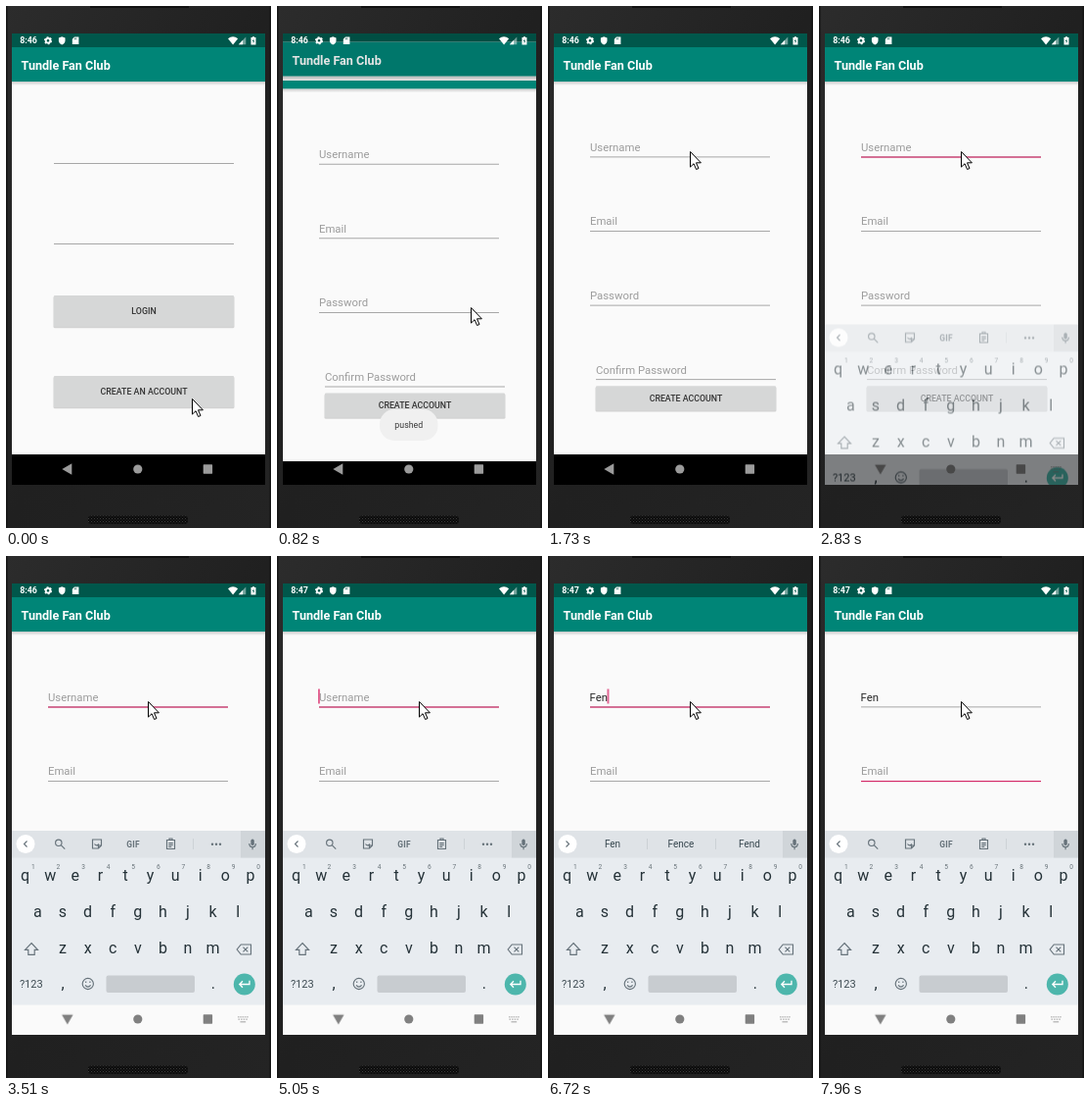
An HTML page for the animation above (8000 ms loop, 271 px wide and 532 px high).

```html
<!DOCTYPE html>
<html lang="en">
<head>
<meta charset="utf-8">
<title>Fan club sign-up</title>
<style>
html, body { margin: 0; width: 100%; height: 100%; overflow: hidden; background: #222; }
svg { display: block; width: 271px; height: 532px; font-family: Roboto, "Open Sans", sans-serif; }
.mid { text-anchor: middle; }
.bar { font-size: 12.6px; font-weight: 600; fill: #fff; }
.btn { font-size: 8.82px; font-weight: 500; fill: #333; text-anchor: middle; }
.input { font-size: 11.34px; fill: #242424; }
.hint { fill: #9c9c9c; }
.key { font-size: 16px; fill: #253238; text-anchor: middle; }
.sup { font-size: 6.6px; fill: #69747a; text-anchor: middle; }
.gif { font-size: 8.4px; font-weight: 700; letter-spacing: .3px; fill: #66727a; text-anchor: middle; }
.ico { fill: none; stroke: #66727a; stroke-width: 1.15; }

/* Everything changes in hard steps on one shared 8 s clock. */
.a { animation: 8s step-end -4ms infinite; }

.mouse { animation-name: mouse; }
@keyframes mouse {
  0% { transform: translate(190px, 400px); }
  6.875% { transform: translate(190px, 395px); }
  8.75% { transform: translate(195px, 352px); }
  10.25% { transform: translate(198px, 307px); }
  17.125% { transform: translate(191px, 288px); }
  18.625% { transform: translate(172px, 232px); }
  20.125% { transform: translate(152px, 170px); }
  21.625%, 100% { transform: translate(145px, 148px); }
}

.toast { animation-name: toast; }
@keyframes toast {
  0% { opacity: 0; }
  3.5% { opacity: .3; }
  5.375% { opacity: .7; }
  6.875% { opacity: 1; }
  17.125% { opacity: .75; }
  18.625% { opacity: .35; }
  20.125%, 100% { opacity: 0; }
}

.leave { animation-name: leave; }
@keyframes leave {
  0% { transform: none; }
  8.75% { transform: translateY(-1px); }
  10.25% { transform: translateY(-5.5px); }
  11.75%, 100% { transform: translateY(-8px); }
}
.dim { animation-name: dim; }
@keyframes dim {
  0% { opacity: 0; }
  8.75% { opacity: .02; }
  10.25%, 100% { opacity: .1; }
}
.reveal { animation-name: reveal; }
@keyframes reveal {
  0% { transform: translateY(532px); }
  8.75% { transform: translateY(440px); }
  10.25% { transform: translateY(76px); }
  11.75% { transform: translateY(48px); }
  13.625%, 100% { transform: translateY(0); }
}
.enter { animation-name: enter; }
@keyframes enter {
  0% { transform: translateY(19px); }
  10.25% { transform: translateY(7.3px); }
  11.75% { transform: translateY(3px); }
  13.625% { transform: translateY(1px); }
  15.25%, 100% { transform: translateY(0); }
}

.caret { animation-name: caret; }
@keyframes caret {
  0% { opacity: 0; transform: none; }
  27% { opacity: 1; }
  32% { opacity: 0; }
  38.875% { opacity: 1; }
  43.875% { opacity: 0; }
  50.875% { opacity: 1; }
  57.75% { opacity: 0; }
  63.125% { opacity: 1; }
  68.25% { opacity: 0; }
  75.125% { opacity: 1; transform: none; }
  77% { transform: translateX(7px); }
  80.5% { transform: translateX(12.5px); }
  84% { transform: translateX(18.5px); }
  89.375% { opacity: 0; }
  96.375% { opacity: 1; transform: translateY(75.6px); }
  99.5%, 100% { opacity: 0; transform: translateY(75.6px); }
}
.focus1 { animation-name: focus1; }
@keyframes focus1 { 0%, 92.875%, 100% { opacity: 0; } 25.125% { opacity: 1; } }
.focus2 { animation-name: focus2; }
@keyframes focus2 { 0% { opacity: 0; } 92.875%, 100% { opacity: 1; } }
.empty { animation-name: empty; }
@keyframes empty { 0% { opacity: 1; } 77%, 100% { opacity: 0; } }
.type1 { animation-name: type1; }
@keyframes type1 { 0% { fill: transparent; } 77%, 100% { fill: #242424; } }
.type2 { animation-name: type2; }
@keyframes type2 { 0% { fill: transparent; } 80.5%, 100% { fill: #242424; } }
.type3 { animation-name: type3; }
@keyframes type3 { 0% { fill: transparent; } 84%, 100% { fill: #242424; } }

.min1 { animation-name: min1; }
@keyframes min1 { 0% { opacity: 1; } 52.375%, 100% { opacity: 0; } }
.min2 { animation-name: min2; }
@keyframes min2 { 0% { opacity: 0; } 52.375%, 100% { opacity: 1; } }

.board { animation-name: board; }
@keyframes board {
  0% { opacity: 0; transform: translateY(45px); }
  35.375% { opacity: .54; transform: translateY(44.5px); }
  37% { opacity: .94; transform: none; }
  38.875%, 100% { opacity: 1; transform: none; }
}
.upper { animation-name: upper; }
@keyframes upper { 0%, 78.625%, 100% { opacity: 0; } 75.125% { opacity: 1; } }
.lower { animation-name: lower; }
@keyframes lower { 0%, 78.625%, 100% { opacity: 1; } 75.125% { opacity: 0; } }
.tools { animation-name: tools; }
@keyframes tools { 0% { opacity: 1; } 78.625% { opacity: 0; } 96.375% { opacity: .6; } 98%, 100% { opacity: 1; } }
.words1 { animation-name: words1; }
@keyframes words1 { 0%, 82.125%, 100% { opacity: 0; } 78.625% { opacity: 1; } }
.words2 { animation-name: words2; }
@keyframes words2 { 0%, 84%, 100% { opacity: 0; } 82.125% { opacity: 1; } }
.words3 { animation-name: words3; }
@keyframes words3 { 0%, 96.375%, 100% { opacity: 0; } 84% { opacity: 1; } }
.chev { animation-name: chev; transform-origin: 20px 293.5px; }
@keyframes chev { 0%, 96.375%, 100% { transform: none; } 78.625% { transform: rotate(180deg); } }

.nav { animation-name: nav; }
@keyframes nav { 0% { fill: #9b9b9b; } 35.375% { fill: #484848; } 37%, 100% { fill: #808080; } }
.back { animation-name: back; transform-origin: 62.8px 472px; }
@keyframes back {
  0% { transform: none; }
  30.5% { transform: rotate(-30deg); }
  32% { transform: rotate(-70deg); }
  33.5%, 100% { transform: rotate(-90deg); }
}
.ime { animation-name: ime; }
@keyframes ime { 0% { opacity: 0; } 32% { opacity: .3; } 33.5%, 100% { opacity: .5; } }
</style>
</head>
<body>
<svg id="stage" viewBox="0 0 271 532"></svg>
<script>
const rect = (x, y, w, h, fill, more = '') =>
  `<rect x="${x}" y="${y}" width="${w}" height="${h}" fill="${fill}" ${more}/>`;
const text = (x, y, cls, s) => `<text x="${x}" y="${y}" class="${cls}">${s}</text>`;
const icon = d => `<path class="ico" d="${d}"/>`;
const line = (x, y) => rect(x, y, 184, .8, '#939393');
const accent = (y, cls) => rect(43, y, 184, 1.05, '#d81b60', `class="a ${cls}"`);
const field = (x, y, label, cls = '') => text(x, y - 5.8, `input hint ${cls}`, label) + line(x, y);
const button = (y, h, label) =>
  rect(48.5, y + .6, 185, h + .6, '#000', 'rx="1.5" opacity=".16"') +
  rect(49, y, 184, h, '#d6d7d7', 'rx="1"') +
  text(141, y + h / 2 + 2.9, 'btn', label);

const chrome = () =>
  rect(6, 28, 259, 429, '#fafafa') +
  rect(6, 77, 259, 4, 'url(#shade)') +
  rect(6, 42, 259, 35, '#008577') +
  rect(6, 14, 259, 28, '#00574b') +
  text(15.5, 65, 'bar', 'Tundle Fan Club');

const login = () => chrome() + line(49, 160) + line(49, 242) +
  button(295, 32, 'LOGIN') + button(377, 32, 'CREATE AN ACCOUNT');

// Fields are spaced 75.6 px apart.
const first = 153.5, gap = 75.6;
const signup = () => chrome() +
  field(43, first, 'Username', 'a empty') + field(43, first + gap, 'Email') +
  field(43, first + 2 * gap, 'Password') + field(49, first + 3 * gap, 'Confirm Password') +
  button(387.3, 25, 'CREATE ACCOUNT') +
  accent(first, 'focus1') + accent(first + gap, 'focus2') +
  `<text x="42.5" y="${first - 5.8}" class="input">${[...'Fen'].map((c, i) =>
    `<tspan class="a type${i + 1}">${c}</tspan>`).join('')}</text>` +
  rect(42.3, 135.5, 1.3, 15, '#d81b60', 'class="a caret"');

const rows = [['qwertyuiop', 19.6, 332], ['asdfghjkl', 32.4, 369], ['zxcvbnm', 58, 406]];
const pitch = 25.6;
const letters = up => rows.map(([keys, x, y]) => [...keys].map((c, i) =>
  text(x + i * pitch, y - (up ? 0 : .8), 'key', up ? c.toUpperCase() : c)).join('')).join('');
const digits = [...'1234567890'].map((c, i) => text(27.8 + i * pitch, 319.2, 'sup', c)).join('');

const shift = 'M26 394.5l6.5 6.8h-3.3v5h-6.4v-5h-3.3z';
const words = [['For', 'From', 'First'], ['Few', 'Feel', 'Fell'], ['Fen', 'Fence', 'Fend']]
  .map((set, n) => `<g class="a words${n + 1}" font-size="10" fill="#37474f">` +
    set.map((w, i) => text(66 + i * 70, 297, 'mid', w)).join('') +
    rect(101, 288, .7, 11, '#c3c9cd') + rect(171, 288, .7, 11, '#c3c9cd') + '</g>').join('');

const tools = `<g class="a tools">
  <circle class="ico" cx="53.8" cy="292.3" r="3.2"/>${icon('M56.2 294.7l4 4')}
  ${icon('M88.5 289h9v6l-3 3h-6zM97.5 295h-3v3M90.5 293.5q2 2.8 4.5 0')}
  ${text(130.2, 296.5, 'gif', 'GIF')}
  ${icon('M164.5 289.5h8v9h-8zM167 289.2v-1.2h3v1.2M166.3 292.5h4.4M166.3 294.4h4.4M166.3 296.3h3')}
  ${rect(191, 288, .8, 11, '#c9ced2')}
  <g fill="#66727a"><circle cx="211" cy="293.8" r="1.2"/><circle cx="215" cy="293.8" r="1.2"/><circle cx="219" cy="293.8" r="1.2"/></g>
</g>`;

const board = `<g class="a board">
  ${rect(6, 280, 259, 178, '#e8ecf0')}${rect(6, 280, 259, 27.5, '#dfe3e7')}
  ${rect(240, 280, 25, 27.5, '#d0d5d9')}${rect(6, 457.5, 259, 80, '#fafafa')}
  <circle cx="20" cy="293.5" r="9.5" fill="#fff"/>
  <path class="ico a chev" d="M21.5 290.5l-3 3 3 3"/>
  ${tools}${words}
  ${rect(250.4, 288.5, 3.4, 6.4, '#66727a', 'rx="1.7"')}${icon('M248.8 293q0 3.6 3.3 3.6t3.3-3.6M252.1 296.6v2.6')}
  ${digits}
  <g class="a lower">${letters(false)}${icon(shift)}</g>
  <g class="a upper">${letters(true)}<path d="${shift}" fill="#56656d"/></g>
  ${icon('M240.2 396h10.3v10h-10.3l-4-5zM242.5 398.6l4.8 4.8M247.3 398.6l-4.8 4.8')}
  <text x="25.8" y="440" class="mid" font-size="11" fill="#3e4b52">?123</text>
  ${text(58.2, 440.5, 'key', ',')}${text(211.8, 440.5, 'key', '.')}
  <circle class="ico" cx="83.8" cy="436" r="5.6"/>${icon('M81 437.4q2.8 3.4 5.6 0M81.7 433.6v1.4M85.9 433.6v1.4')}
  ${rect(102.5, 427.5, 90.5, 17.5, '#c8ccd0', 'rx="2"')}
  <circle cx="243.8" cy="436.5" r="11" fill="#4db6ac"/>
  <path d="M249 432.8v3.7h-10M242 433.3l-3.2 3.2 3.2 3.2" fill="none" stroke="#fff" stroke-width="1.3"/>
</g>`;

const nav = `<g class="a nav">
  <path class="a back" d="M57.3 472l10-5.8v11.6z"/>
  <circle cx="134.8" cy="472" r="4.6"/>
  <rect x="201.7" y="467.3" width="9.4" height="9.4" rx=".6"/>
  <path class="a ime" d="M237 469h1.5v1.5h-1.5zm2.3 0h1.5v1.5h-1.5zm2.3 0h1.5v1.5h-1.5zm2.3 0h1.5v1.5h-1.5zm2.3 0h1.5v1.5h-1.5zM237.5 471.4h1.5v1.5h-1.5zm2.6 0h1.5v1.5h-1.5zm2.6 0h1.5v1.5h-1.5zm2.6 0h1.5v1.5h-1.5zM239.5 474h5.7v1.4h-5.7z"/>
</g>`;

const status = `<g fill="#fff" font-size="8.8" font-weight="600">
  ${text(14.3, 38.4, 'a min1', '8:46')}${text(14.3, 38.4, 'a min2', '8:47')}
  <circle cx="43" cy="35.3" r="2.3" fill="none" stroke="#fff" stroke-width="1.9"/>
  <circle cx="43" cy="35.3" r="3.5" fill="none" stroke="#fff" stroke-width="1.1" stroke-dasharray="1.9 1.765"/>
  <path d="M57.2 31.3l3.3 1.3v2.7q0 2.8-3.3 4.3-3.3-1.5-3.3-4.3v-2.7z"/>
  <path d="M70 31.5h4.4v7.6h-6.6v-5.4zM70.3 32.6v1.6h.7v-1.6zm1.3 0v1.6h.7v-1.6z" fill-rule="evenodd"/>
  <path d="M227 33.2q5-4 10.2 0l-5.1 6.2z"/>
  <path d="M245.3 31.5v7.7h-7.4z" opacity=".45"/><path d="M242.2 34.7v4.5h-4.3z"/>
  <path d="M251.9 31.2h2.2v.8h1.4v7.4h-5v-7.4h1.4z"/>
  <path d="M253.4 33.2l-1.5 2.9h1l-.3 2.2 1.6-2.9h-1z" fill="#00574b"/>
</g>`;

document.getElementById('stage').innerHTML = `
<defs>
  <linearGradient id="case" x2="1" y2="1">
    <stop stop-color="#2c2c2c"/><stop offset=".5" stop-color="#202020"/><stop offset="1" stop-color="#242424"/>
  </linearGradient>
  <linearGradient id="shade" x2="0" y2="1">
    <stop stop-color="#cacaca"/><stop offset="1" stop-color="#fafafa"/>
  </linearGradient>
  <pattern id="mesh" width="3" height="3" patternUnits="userSpaceOnUse">
    ${rect(0, 0, 3, 3, '#0b0b0b')}${rect(0, 0, 1, 1, '#3a3a3a')}${rect(1.5, 1.5, 1, 1, '#2c2c2c')}
  </pattern>
  <clipPath id="screen"><rect x="6" y="28" width="259" height="460"/></clipPath>
  <clipPath id="reveal"><rect class="a reveal" width="271" height="532"/></clipPath>
</defs>
${rect(0, 0, 271, 532, 'url(#case)')}
${rect(0, 0, 1.5, 532, '#141414')}${rect(269.5, 0, 1.5, 532, '#141414')}
${rect(86, 0, 101, 2, '#111')}
${rect(84, 519.5, 102, 8.5, 'url(#mesh)', 'rx="3"')}
<g clip-path="url(#screen)">
  ${rect(6, 28, 259, 460, '#000')}
  <g class="a leave">${login()}${rect(6, 14, 259, 443, '#000', 'class="a dim"')}</g>
  <g clip-path="url(#reveal)"><g class="a enter">${signup()}</g></g>
  <g class="a toast">
    ${rect(105, 411, 59.5, 32, '#f0f0f0', 'rx="15"')}
    <text x="134.8" y="430" class="mid" font-size="8.82" fill="#3a3a3a">pushed</text>
  </g>
  ${board}${nav}${status}
</g>
<path class="a mouse" d="M.5 .5v15.6l3.6-3.4 2.5 5.8 2.4-1-2.5-5.7h4.9z" fill="#fff" stroke="#000"/>`;
</script>
</body>
</html>
```
